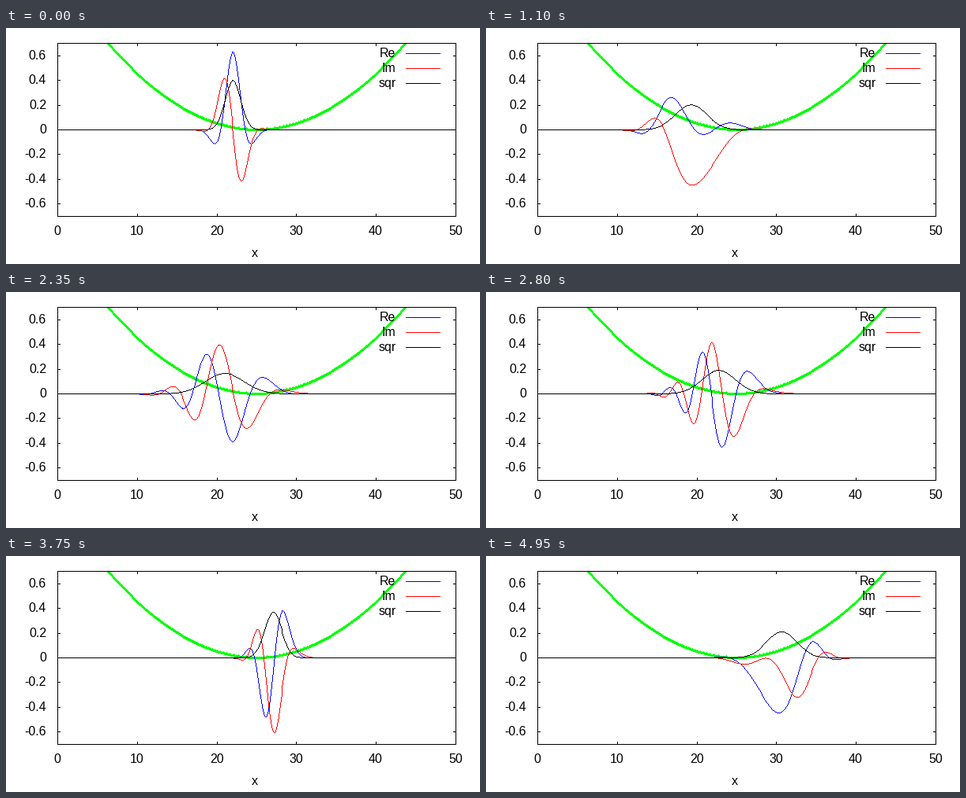
Recreate the animation shown at these times as a matplotlib script. Size 600 px wide and 300 px high, loop 5000 ms.

```python
import numpy as np
import matplotlib.pyplot as plt
from matplotlib.animation import FuncAnimation
from matplotlib.patches import Rectangle

W, H, DPI = 600, 300, 100
FRAMES, INTERVAL = 100, 50
PX = 72 / DPI  # points per pixel
LEFT, RIGHT, TOP, BOTTOM = 65, 569, 19, 239
X_MAX, Y_MAX = 50, 0.7
TIC = 3

# Gaussian packet in a harmonic well (hbar = m = 1)
OMEGA, CENTER = 0.2, 25
Q0, P0, SIGMA0 = -3, -1, 1
STEP, DT = 0.2, 0.005

plt.rcParams.update({
    "font.family": "Liberation Sans",
    "font.size": 16 * PX,
    "path.simplify": False,
})

x = np.arange(512) * X_MAX / 512


def col(v):
    return np.floor(LEFT + np.asarray(v) / X_MAX * (RIGHT - LEFT) + 0.5)


def row(v):
    span = BOTTOM - TOP
    up = np.floor((np.asarray(v) + Y_MAX) / (2 * Y_MAX) * span + 0.5)
    return BOTTOM - up


def psi(t):
    """Exact wave function at time t."""
    c, s = np.cos(OMEGA * t), np.sin(OMEGA * t)
    q = Q0 * c + P0 / OMEGA * s
    p = P0 * c - OMEGA * Q0 * s
    ratio = 1 / (2 * OMEGA * SIGMA0**2)
    z = c + 1j * ratio * s
    angle = np.angle(z) % (2 * np.pi)
    alpha = OMEGA / 2 * (1j * ratio * c - s) / z
    u = x - CENTER - q
    phase = alpha * u**2 + p * u + (p * q - P0 * Q0) / 2 - angle / 2
    norm = (2 * np.pi * SIGMA0**2) ** -0.25 / np.sqrt(abs(z))
    return norm * np.exp(1j * phase)


def trace(xs, ys, thick=1):
    """Polyline on the pixel grid, as one short pen stroke per step."""
    dx, dy = np.diff(xs), np.diff(ys)
    steps = np.maximum(abs(dx), abs(dy)).astype(int)
    count = steps + 1
    seg = np.repeat(np.arange(len(steps)), count)
    k = np.arange(len(seg)) - np.repeat(np.cumsum(count) - count, count)
    f = k / np.maximum(steps, 1)[seg]
    px = np.floor(xs[seg] + dx[seg] * f + 0.5)
    py = np.floor(ys[seg] + dy[seg] * f + 0.5)

    # Steep parts get a horizontal pen, flat parts a vertical one
    pen = np.maximum(thick * np.hypot(dx, dy) // np.maximum(steps, 1), 1)[seg]
    steep = (abs(dy) > abs(dx))[seg]
    back = pen // 2
    gap = np.full(len(seg), np.nan)
    x0 = np.where(steep, px - back, px + 0.5)
    y0 = np.where(steep, py + 0.5, py - back)
    x1, y1 = x0 + pen * steep, y0 + pen * ~steep
    return np.c_[x0, x1, gap].ravel(), np.c_[y0, y1, gap].ravel()


fig = plt.figure(figsize=(W / DPI, H / DPI), dpi=DPI, facecolor="white")
ax = fig.add_axes([0, 0, 1, 1])
ax.set_xlim(0, W)
ax.set_ylim(H, 0)
ax.axis("off")
plot_box = Rectangle((LEFT, TOP), RIGHT - LEFT + 1, BOTTOM - TOP + 1,
                     transform=ax.transData)


def rule(xs, ys, color="black", z=6):
    """Straight one-pixel lines through pixel centres."""
    ax.plot(np.add(xs, 0.5), np.add(ys, 0.5), color=color, lw=PX, zorder=z,
            antialiased=False, snap=False, solid_capstyle="projecting",
            solid_joinstyle="miter")


def curve(ys, color, z, thick=1):
    artist, = ax.plot(*trace(col(x), row(ys), thick), color=color, lw=PX,
                      zorder=z, snap=False, solid_capstyle="butt")
    artist.set_clip_path(plot_box)
    return artist


def label(px, baseline, text, align):
    ax.text(px, baseline, text, ha=align, va="baseline", color="black")


# Border, tics and labels
rule([LEFT, RIGHT, RIGHT, LEFT, LEFT], [TOP, TOP, BOTTOM, BOTTOM, TOP])
for v in range(0, X_MAX + 1, 10):
    cx = col(v)
    rule([cx, cx], [BOTTOM, BOTTOM - TIC])
    rule([cx, cx], [TOP, TOP + TIC])
    label(cx, 263, str(v), "center")
for k in range(-3, 4):
    cy = row(0.2 * k)
    rule([LEFT, LEFT + TIC], [cy, cy])
    rule([RIGHT, RIGHT - TIC], [cy, cy])
    label(51, cy + 5, f"{0.2 * k:.1f}" if k else "0", "right")
label(315, 291, "x", "center")

# Well
curve(0.002 * (x - CENTER) ** 2, "#00ff00", 2, thick=3)

# Curves with their legend entries
curves = []
for i, (name, color) in enumerate([("Re", "#0000ff"), ("Im", "#ff0000"),
                                   ("sqr", "#000000")]):
    cy = 32 + 19 * i
    label(493.5, cy + 5, name, "right")
    rule([506, 549], [cy, cy], color, 1)
    curves.append(curve(0 * x, color, 3 + i))


def update(n):
    wave = psi(STEP * (n - 1) + DT if n else 0)
    for artist, ys in zip(curves, (wave.real, wave.imag, abs(wave) ** 2)):
        artist.set_data(*trace(col(x), row(ys)))
    return curves


anim = FuncAnimation(fig, update, frames=FRAMES, interval=INTERVAL,
                     repeat=True, repeat_delay=0)
plt.show()
```
